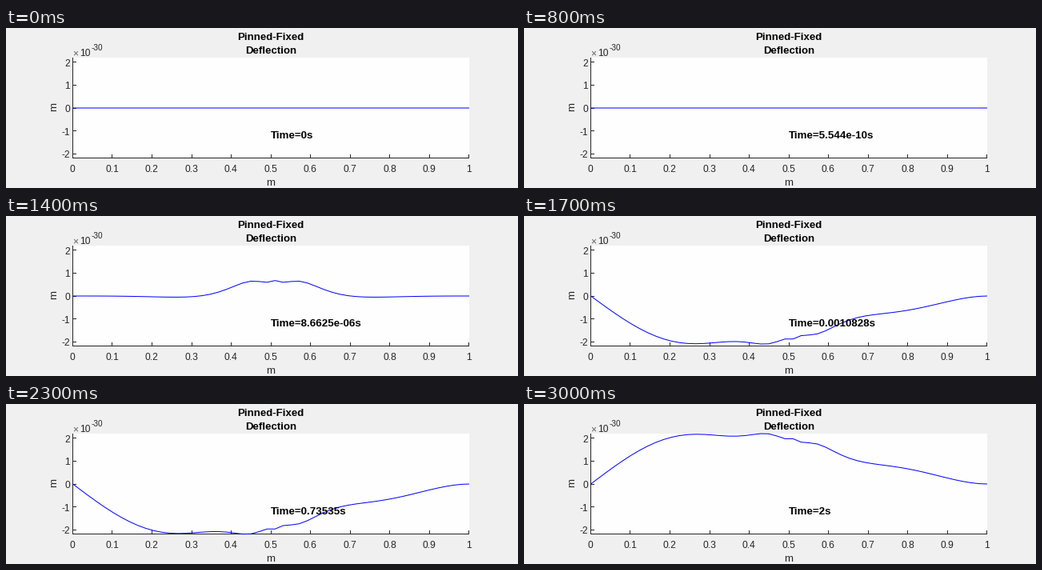
These frames come from a looping animation (640x200 px, 3.1 s). A matplotlib script:

```python
import numpy as np
import matplotlib.pyplot as plt
from matplotlib.animation import FuncAnimation
from matplotlib.patches import Rectangle

W, H, DPI = 640, 200, 100
LEFT, RIGHT, TOP, BOTTOM = 83.5, 579.0, 37.5, 162.5
Y_LIM, PEAK = 2.19, 2.205   # in units of 1e-30 m
INK = "#262626"
PX = 72 / DPI               # one pixel in points

# Beam: nodes, stiffness speed sqrt(EI / rho A), struck node
NODES, SPEED, STRUCK = 50, 935.0, 25
# Time steps grow fivefold up to a largest step
FIRST_STEP, MAX_STEP, END_TIME = 5.67703e-15, 0.2, 2.0


def step_times():
    times, step = [0.0], FIRST_STEP
    while times[-1] < END_TIME:
        times.append(min(times[-1] + step, END_TIME))
        step = min(5 * step, MAX_STEP)
    return np.array(times)


def beam_stiffness():
    """Fourth difference, pinned at the left end and fixed at the right."""
    n = NODES - 2
    k = (6 * np.eye(n)
         - 4 * (np.eye(n, k=1) + np.eye(n, k=-1))
         + np.eye(n, k=2) + np.eye(n, k=-2))
    k[0, 0], k[-1, -1] = 5, 7
    return k * SPEED ** 2 * (NODES - 1) ** 4


def deflections(times):
    """Trapezoidal rule: each mode turns by 2 atan(h w / 2) per step."""
    lam, modes = np.linalg.eigh(beam_stiffness())
    omega = np.sqrt(lam)
    turns = 2 * np.arctan(np.outer(np.diff(times), omega) / 2)
    phase = np.vstack([np.zeros_like(omega), np.cumsum(turns, axis=0)])
    amps = np.sin(phase) / omega * modes[STRUCK - 1]
    u = np.pad(amps @ modes.T, ((0, 0), (1, 1)))
    return u * PEAK / np.abs(u).max()


def to_x(x):
    return LEFT + (RIGHT - LEFT) * x


def to_y(y):
    return (TOP + BOTTOM) / 2 - (BOTTOM - TOP) / 2 * y / Y_LIM


plt.rcParams["font.family"] = "Liberation Sans"
fig = plt.figure(figsize=(W / DPI, H / DPI), dpi=DPI, facecolor="#f0f0f0")
ax = fig.add_axes([0, 0, 1, 1])
ax.set_xlim(0, W)
ax.set_ylim(H, 0)
ax.axis("off")


def label(x, y, text, size=12, color=INK, ha="center", **kw):
    return ax.text(x, y, text, fontsize=size * PX, color=color, ha=ha,
                   va=kw.pop("va", "baseline"), **kw)


def stroke(xs, ys, color=INK, z=2):
    return ax.plot(xs, ys, color=color, lw=PX, snap=False, zorder=z,
                   solid_capstyle="butt", clip_on=False)[0]


def draw_axes():
    ax.add_patch(Rectangle((LEFT, TOP - 0.5), RIGHT - LEFT, BOTTOM - TOP,
                           fc="#fefefe", ec="none", snap=False, zorder=1))
    stroke([LEFT, LEFT], [TOP - 0.5, BOTTOM + 0.5])
    stroke([LEFT - 0.5, RIGHT], [BOTTOM, BOTTOM])
    for i in range(11):
        x = to_x(i / 10)
        tick = np.floor(x - 0.1) + 0.5
        stroke([tick, tick], [BOTTOM - 4.5, BOTTOM])
        label(x - 0.5, 180, f"{i / 10:g}")
    for v in range(-2, 3):
        y = to_y(v)
        tick = np.floor(y) + 0.5
        stroke([LEFT, LEFT + 4.5], [tick, tick])
        label(80, y + 5, str(v), ha="right")
    label(83, 35, "×", ha="left", color="#606060")
    label(92, 35, "10", ha="left")
    label(107, 28, "-30", size=10, ha="left")
    label(331, 197, "m", size=13.2)
    label(66, 99, "m", size=13.2, ha="right", va="center", rotation=90)
    label(331, 15, "Pinned-Fixed", size=13.2, color="black", weight="bold")
    label(331.5, 32, "Deflection", size=13.2, color="black", weight="bold")


draw_axes()
times = step_times()
shapes = deflections(times)
node_x = to_x(np.linspace(0, 1, NODES))
curve = stroke(node_x, to_y(shapes[0]), color="#0000ff", z=3)
clock = label(331, 138, "", size=13.33, color="black", ha="left",
              weight="bold", zorder=4)


def update(i):
    curve.set_ydata(to_y(shapes[i]))
    clock.set_text(f"Time={times[i]:.5g}s")
    return curve, clock


anim = FuncAnimation(fig, update, frames=len(times), interval=100,
                     init_func=lambda: update(0), repeat=True, repeat_delay=0)
plt.show()
```
